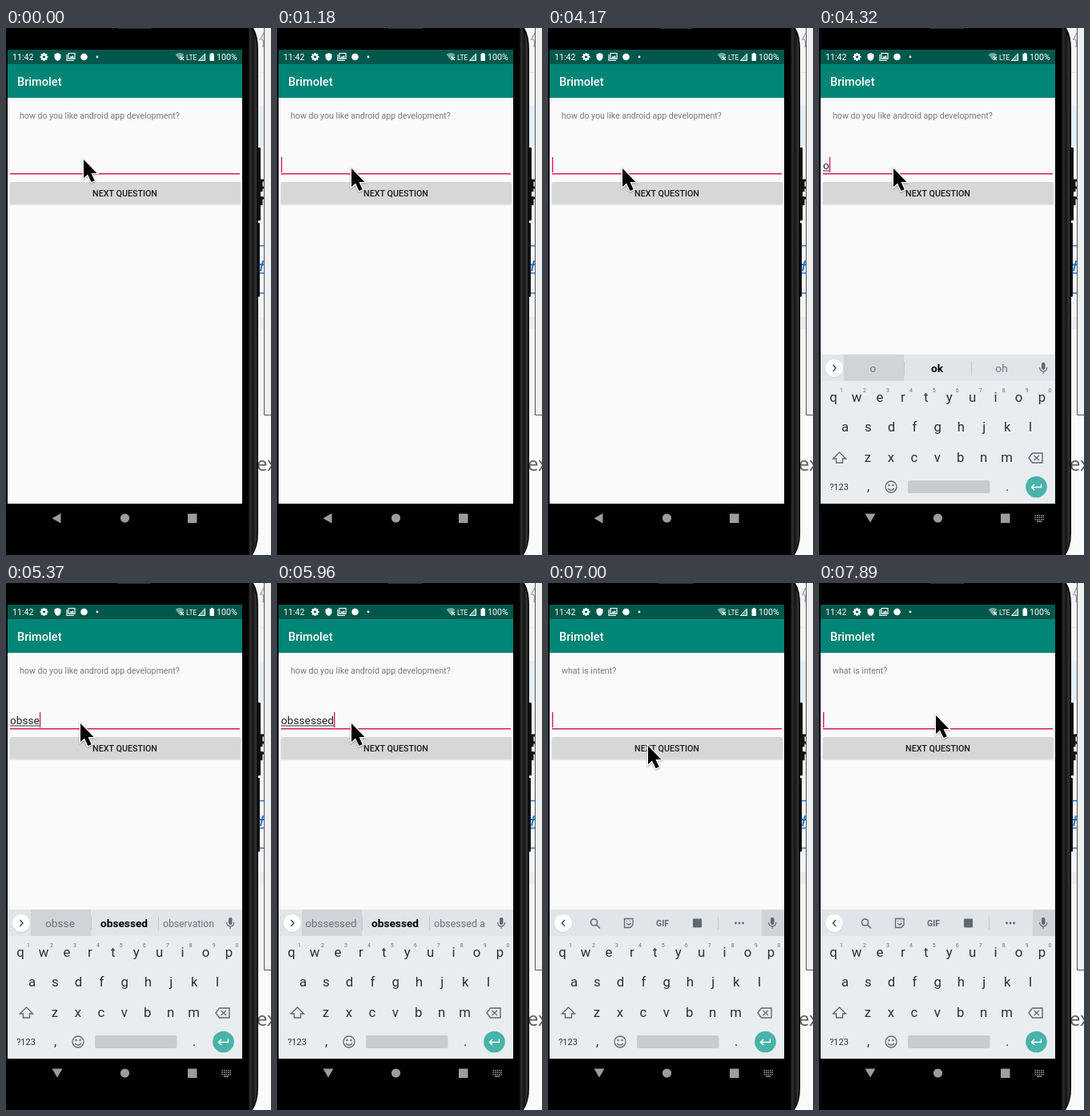
Write an HTML page with a canvas that moves like this. It is 331 by 657 pixels and loops after 8000 ms.

```html
<!DOCTYPE html>
<html>
<head>
<meta charset="utf-8">
<style>
html, body { margin: 0; width: 100%; height: 100%; overflow: hidden; background: #fafafa; }
canvas { display: block; }
</style>
</head>
<body>
<canvas id="stage" width="331" height="657"></canvas>
<script>
const ctx = document.getElementById('stage').getContext('2d');
const LOOP = 8000, ACCENT = '#d81b60', INK = '#263238', ICON = '#5f6a70';

// Each entry is [start time, value]; the last one reached holds.
const CARET = [[0, 0], [290, 1], [730, 0], [1180, 1], [1630, 0], [2220, 1], [2670, 0], [3120, 1],
  [3720, 0], [4170, 1], [6410, 0], [6850, 1], [7450, 0], [7890, 1]];
const CURSOR = [[0, [97, 164]], [140, [95, 170]], [290, [93, 175]], [6260, [109, 189]],
  [6410, [125, 203]], [7300, [132, 190]], [7450, [139, 177]], [7600, [146, 165]]];
const TYPED = [[0, 0], [4320, 1], [4770, 2], [5070, 3], [5220, 4], [5370, 5], [5520, 6],
  [5670, 7], [5820, 8], [5960, 9], [6850, 0]];
const RIPPLE = [[0, null], [6700, [22, 228]], [6850, [5, 288]], [7000, null]];
const GUESSES = [[], ['ok', 'oh'], ['of', 'on'], ['obs', 'observe'], ['obsessed', 'observation'],
  ['obsessed', 'observation'], ['obsesses', 'obsessed'], ['obsess', 'obsessed'],
  ['obsessed', 'obsesses'], ['obsessed', 'obsessed a']];
const WORD = 'obssessed';

const at = (track, t) => track.filter(([start]) => start <= t).pop()[1];

function rect(x, y, w, h, color, r = 0) {
  ctx.fillStyle = color;
  ctx.beginPath();
  ctx.roundRect(x, y, w, h, r);
  ctx.fill();
}
function disc(x, y, r, color) {
  ctx.fillStyle = color;
  ctx.beginPath();
  ctx.arc(x, y, r, 0, 7);
  ctx.fill();
}
function fill(path, color, x = 0, y = 0) {
  ctx.save();
  ctx.translate(x, y);
  ctx.fillStyle = color;
  ctx.fill(new Path2D(path));
  ctx.restore();
}
function line(path, color, width = 1, x = 0, y = 0) {
  ctx.save();
  ctx.translate(x, y);
  ctx.strokeStyle = color;
  ctx.lineWidth = width;
  ctx.stroke(new Path2D(path));
  ctx.restore();
}
function text(s, x, y, size, color, align = 'left', weight = 400, family = 'Roboto') {
  ctx.font = `${weight} ${size}px ${family}, sans-serif`;
  ctx.textAlign = align;
  ctx.fillStyle = color;
  ctx.fillText(s, x, y);
  return ctx.measureText(s).width;
}

function backdrop() {
  rect(0, 0, 331, 657, '#fafafa');
  rect(313, 0, 18, 483, '#f4f4f6');
  rect(313, 97, 18, 50, '#e2eefa');
  rect(313, 360, 18, 15, '#ececee');
  line('M322 6L318 14Q323 13 321 24', '#a5a7b0', 1.5);
  line('M315 55.5H331', '#e2e2e4');
  line('M317 190H322M317 199H322M317 212H322M319 190V204M319 210V221', '#111', 3);
  line('M315 271.5H322M315 305.5H322M315 330.5H322', '#1976d2', 1.5);
  line('M321 290L318 303M317 295H322', '#1976d2', 2);
  rect(323, 0, 8, 483, '#f0f0f0');
  line('M322.5 0V482.5H331', '#555');
  text('ex', 313, 552, 24, '#5c5c5c', 'left', 400, 'Open Sans');
}

function phone() {
  rect(313, 149, 5, 91, '#111', 1);
  rect(313, 243, 4, 92, '#111', 1);
  fill('M0 0H309Q315 9 315 28V630Q315 646 308 657H0Z', '#060606');
  const edge = ctx.createLinearGradient(302, 0, 315, 0);
  [['#000', 0], ['#2d2d2d', .25], ['#151515', .5], ['#343434', .8], ['#080808', 1]]
    .forEach(([c, p]) => edge.addColorStop(p, c));
  line('M299 0Q308 9 308 28V630Q308 646 301 657', edge, 11);
  rect(0, 0, 303, 657, '#000');
  rect(138, -4, 44, 5, '#333', 2);
}

function statusBar() {
  rect(2, 27, 293, 18, '#00574b');
  const white = '#fff';
  text('11:42', 8, 40, 10.6, white);
  for (let i = 0; i < 4; i++) {
    const a = i * Math.PI / 4, c = Math.cos(a) * 5, s = Math.sin(a) * 5;
    line(`M${-c} ${-s}L${c} ${s}`, white, 2, 47.5, 36);
  }
  disc(47.5, 36, 3.7, white);
  disc(47.5, 36, 1.6, '#00574b');
  fill('M0 -5L4 -3.3V0Q4 3.5 0 5Q-4 3.5 -4 0V-3.3Z', white, 64.5, 36);
  line('M-3 -4.5H5V2.5H-3ZM-5 -3V4.5H4', white, 1.2, 81, 36);
  fill('M-2 1.5L0 -1L1 0L2.5 -2L4 1.5Z', white, 81, 36);
  disc(97.5, 36, 4.3, white);
  disc(114, 36, 1.4, white);
  fill('M-5.5 -3Q0 -7 5.5 -3L0 4Z', '#77aaa2', 217, 36);
  line('M1 0L5 4M5 0L1 4', white, 1.2, 217, 36);
  text('LTE', 225, 39.5, 8.6, white);
  fill('M249 31V41H239.5Z', '#5d9b93');
  line('M248.5 32V40.5H240.5Z', white);
  rect(254.5, 32, 5.5, 9, white, .8);
  rect(256, 31, 2.5, 2, white);
  text('100%', 263, 40, 10.7, white);
}

function app(t) {
  rect(2, 27, 293, 566, '#fafafa');
  rect(2, 87, 293, 1, '#e6e6e6');
  rect(2, 45, 293, 42, '#008577');
  statusBar();
  text('Brimolet', 14, 72, 14.6, '#fff', 'left', 500);
  text(t < 6850 ? 'how do you like android app development?' : 'what is intent?',
    17, 113, 10.6, '#777');

  const typed = WORD.slice(0, at(TYPED, t));
  const width = text(typed, 5, 176, 13.7, '#222');
  if (typed) rect(5, 177.5, width, 1, '#333');
  rect(5, 181, 287, 1.6, ACCENT);
  if (at(CARET, t)) rect(5 + width, 161, 1.4, 19, ACCENT);

  rect(4.5, 193, 289, 28, '#e6e6e6', 2);
  rect(5, 192, 288, 27.5, '#d6d7d7', 1.5);
  const ripple = at(RIPPLE, t);
  if (ripple) rect(ripple[0], 192, ripple[1], 27.5, '#b9baba', 1.5);
  text('NEXT QUESTION', 148.5, 209.5, 10.7, '#1c1c1c', 'center', 500);
}

function mic() {
  rect(278, 417, 4.5, 9, ICON, 2.2);
  line('M275.7 423Q275.7 428 280.2 428Q284.7 428 284.7 423M280.2 428V431', ICON, 1.2);
}

function suggestion(s, x, weight) {
  ctx.font = `${weight} 13.7px Roboto, sans-serif`;
  const size = Math.min(13.7, 13.7 * 64 / ctx.measureText(s).width);
  text(s, x, 429, size, weight > 400 ? '#000' : '#6b7378', 'center', weight);
}

function toolbar() {
  rect(267, 407, 28, 33, '#d0d3d7');
  line('M21 420L17.5 424L21 428', '#444', 1.4);
  line('M61.5 423A4 4 0 1 1 53.5 423A4 4 0 1 1 61.5 423M60.5 426L65 430.5', ICON, 1.6);
  line('M95.5 418.5H106V426L103 429.5H95.5ZM98 424Q100.5 428 103.5 424M98 421.5H99M102 421.5H103', ICON, 1.3);
  text('GIF', 143, 427.5, 10.5, ICON, 'center', 700);
  rect(181, 418.5, 11, 11, ICON, 1);
  rect(212, 416, 1, 16, '#c3c8cc');
  [234.5, 239, 243.5].forEach(x => disc(x, 424, 1.4, ICON));
}

function keyRow(letters, x, y) {
  [...letters].forEach((c, i) => text(c, x + i * 28.95, y, 16.8, INK, 'center'));
}

function keyboard(t) {
  rect(2, 407, 293, 186, '#e9edf0');
  rect(2, 407, 293, 33, '#e1e4e8');
  disc(19, 424.5, 11.4, '#cfd2d5');
  disc(19, 424, 11, '#fff');
  if (t < 7000) {
    const n = at(TYPED, Math.min(t, 6849)), [best, other] = GUESSES[n];
    rect(31, 407, 75, 33, '#d0d3d7');
    line('M17.5 420L21 424L17.5 428', '#444', 1.4);
    rect(106, 416, 1, 17, '#c3c8cc');
    rect(190, 416, 1, 17, '#c3c8cc');
    suggestion(WORD.slice(0, n), 67.5, 400);
    suggestion(best, 147.5, 700);
    suggestion(other, 228, 400);
  } else toolbar();
  mic();

  keyRow('qwertyuiop', 18, 465.5);
  [...'1234567890'].forEach((d, i) => text(d, 28 + i * 28.95, 453.5, 7, '#66747c', 'center'));
  keyRow('asdfghjkl', 32.5, 502.5);
  keyRow('zxcvbnm', 61, 540.5);
  line('M0 -7L8 1H4V6H-4V1H-8Z', ICON, 1.4, 25.5, 536);
  line('M-9 0L-4.5 -6H8V6H-4.5ZM-2.5 -3L4 3M4 -3L-2.5 3', ICON, 1.4, 271, 536);
  text('?123', 25, 576, 11, INK, 'center');
  text(',', 61.5, 577, 16, INK, 'center');
  line('M7 0A7 7 0 1 1 -7 0A7 7 0 1 1 7 0M-4 2Q0 6.5 4 2', ICON, 1.3, 90, 572);
  disc(87.5, 570, 1.2, ICON);
  disc(92.5, 570, 1.2, ICON);
  rect(111, 564, 102.5, 16, '#c8cccf', 2);
  text('.', 235, 577, 16, INK, 'center');
  disc(271.5, 572, 13.3, '#48b3a8');
  line('M6 -4V0H-6M-2.5 -3.5L-6 0L-2.5 3.5', '#fff', 1.5, 271.5, 572.5);
}

function navBar(open) {
  const gray = '#9d9d9d';
  fill(open ? 'M57.5 605.5H70.5L64 616.5Z' : 'M68.5 605V617.5L57.5 611.2Z', gray);
  disc(148.5, 611, 5.6, gray);
  rect(227, 605.5, 11.5, 11.5, gray, .5);
  if (!open) return;
  for (let row = 0; row < 3; row++)
    for (let col = 0; col < 5; col++) rect(269.5 + col * 2.5, 607 + row * 2.5, 1.5, 1.5, gray);
  rect(272, 614.5, 6.5, 1.3, gray);
}

function cursor([x, y]) {
  const arrow = 'M0 0V23L5 18.5L9.5 28L13.7 26.2L9.5 17H16.5Z';
  ctx.save();
  ctx.shadowColor = 'rgba(0,0,0,.35)';
  ctx.shadowBlur = 2;
  ctx.shadowOffsetY = 1;
  line(arrow, '#fff', 2.6, x, y);
  ctx.restore();
  fill(arrow, '#000', x, y);
}

function draw(now) {
  const t = now % LOOP, open = t >= 4320;
  backdrop();
  phone();
  app(t);
  if (open) keyboard(t);
  navBar(open);
  cursor(at(CURSOR, t));
  requestAnimationFrame(draw);
}
requestAnimationFrame(draw);
</script>
</body>
</html>
```
